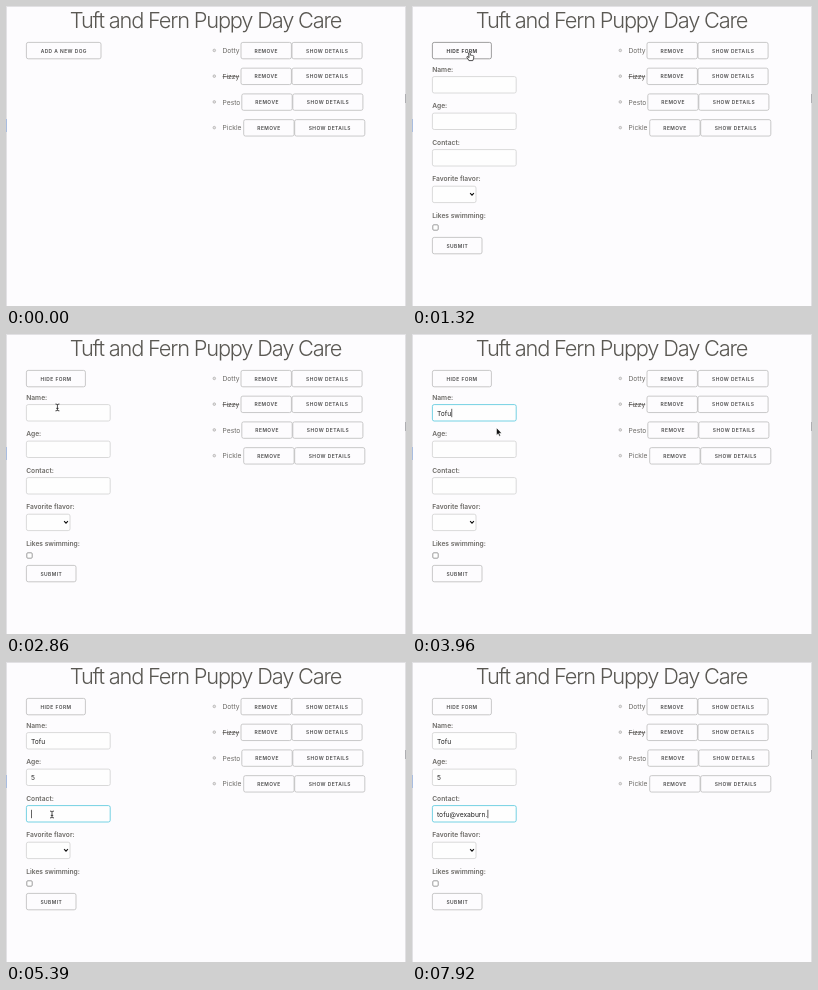
Recreate the animation shown at these times as an HTML page. Size 400x300 px, loop 8 s.

```html
<!DOCTYPE html>
<html lang="en">
<head>
<meta charset="utf-8">
<title>Puppy Day Care</title>
<style>
html, body { margin: 0; width: 100%; height: 100%; overflow: hidden; background: #fdfcfe; }
svg { display: block; width: 400px; height: 300px; font: 6.7px Inter, "Liberation Sans", sans-serif; }
text { fill: #6b6965; white-space: pre; }
.title { font-size: 21.8px; font-weight: 300; letter-spacing: -1.18px; text-anchor: middle; fill: #5a5853; }
.struck { text-decoration: line-through; fill: #55534f; }
.label { font-weight: 600; }
.bullet { fill: #e4e3e4; stroke: #a3a1a0; stroke-width: .6; }
.button rect { fill: none; stroke: #bbb; stroke-width: .8; }
.button text { font-size: 4.9px; font-weight: 600; letter-spacing: .45px; text-anchor: middle; fill: #4c4c4c; }
.button.hover rect { stroke: #888; }
.button.hover text { fill: #2c2c2c; }
.field rect { fill: #fefefe; stroke: #d1d1d1; stroke-width: .8; }
.field text { fill: #222; }
.field.focus rect { stroke: #52c6dc; }
.field line { stroke: #222; stroke-width: .7; }
</style>
</head>
<body>
<svg viewBox="0 0 400 300">
  <g id="page">
    <path d="M0 .5H400M.5 0V300M399.5 0V300" stroke="#e2e1e4"/>
    <path d="M.5 113V126" stroke="#a9bde0"/>
    <path d="M399.5 88V97" stroke="#aeaeb2"/>
    <text class="title" x="199.6" y="22.2">Tuft and Fern Puppy Day Care</text>
  </g>
  <g id="form">
    <rect x="20.4" y="180.2" width="43.6" height="16.4" rx="1.8" fill="#fefefe" stroke="#d1d1d1" stroke-width=".8"/>
    <path d="M58.1 187.2l1.9 2 1.9-2" fill="none" stroke="#111" stroke-width="1.1"/>
    <rect x="20.8" y="218.8" width="5.4" height="5.4" rx="1" fill="#fff" stroke="#767676" stroke-width=".7"/>
  </g>
  <g id="cursor" stroke-linejoin="round" stroke-linecap="round">
    <path id="arrow" d="M0 0V7.2L1.7 5.7 2.8 8.2 4 7.7 2.9 5.2H5.1Z" fill="#111" stroke="#fff" stroke-width=".5"/>
    <path id="hand" d="M-.7 .6Q0-.4.7.6V3.2Q1.4 2.6 2 3.3 2.7 2.9 3.2 3.6 4.3 3.4 4.3 4.6 4.3 6.8 3.3 8.6H-.6Q-1.4 7-2.6 5.4-2.8 4.2-1.6 4.6L-.7 5.4Z" fill="#fff" stroke="#222" stroke-width=".8"/>
    <path id="beam" d="M-1.6-3.4Q0-3.4 0-2.6 0-3.4 1.6-3.4M0-2.6V2.6M-1.6 3.4Q0 3.4 0 2.6 0 3.4 1.6 3.4M-.8 .9H.8" fill="none" stroke="#222" stroke-width=".8"/>
  </g>
</svg>
<script>
const LOOP = 8000, STEP = 110;
const $ = id => document.getElementById(id);
const page = $("page"), form = $("form"), cursor = $("cursor");

function add(parent, tag, attrs, text = "") {
  const el = document.createElementNS("http://www.w3.org/2000/svg", tag);
  for (const key in attrs) el.setAttribute(key, attrs[key]);
  el.textContent = text;
  return parent.appendChild(el);
}

function box(parent, x, y, width) {
  return add(parent, "rect", { x: x + .4, y: y + .4, width: width - .8, height: 16.4, rx: 1.8 });
}

function button(parent, x, y, width, label) {
  const g = add(parent, "g", { class: "button" });
  box(g, x, y, width);
  add(g, "text", { x: x + width / 2 + .1, y: y + 10.7 }, label);
  return g;
}

function field(y) {
  const g = add(form, "g", { class: "field" });
  box(g, 20, y, 84.6);
  const text = add(g, "text", { x: 25, y: y + 11.3 });
  const caret = add(g, "line", { y1: y + 4.6, y2: y + 13 });
  return { g, text, caret };
}

[["Dotty", 234.6], ["Fizzy", 234.6], ["Pesto", 235.4], ["Pickle", 237.3]].forEach(([name, x], i) => {
  const y = 36 + 25.75 * i;
  add(page, "circle", { class: "bullet", cx: 208.3, cy: y + 8.4, r: 1.3 });
  add(page, "text", { class: i == 1 ? "struck" : "", x: 216.5, y: y + 11 }, name);
  button(page, x, y, 51.2, "REMOVE");
  button(page, x + 51, y, 70.9, "SHOW DETAILS");
});

["Name:", "Age:", "Contact:", "Favorite flavor:", "Likes swimming:"].forEach((label, i) =>
  add(form, "text", { class: "label", x: 20.2, y: 65.7 + 36.5 * i }, label));

const opener = button(page, 20, 36, 75.4, "ADD A NEW DOG");
const closer = button(form, 20, 36, 59.8, "HIDE FORM");
button(form, 20, 231, 50.4, "SUBMIT");

// Each entry: value, focus span, moment of every keystroke
const entries = [
  { ...field(70.2), value: "Tofu", from: 2970, to: 4400, keys: [3410, 3520, 3630, 3740] },
  { ...field(106.7), value: "5", from: 4400, to: 5390, keys: [4840] },
  { ...field(143.2), value: "tofu@vexaburn.", from: 5390, to: LOOP,
    keys: [5720, 5830, 5940, 6050, 6270, 6380, 6600, 6710, 6930, 7150, 7260, 7590, 7700, 7920] }
];

const path = [
  [110, 140, 310], [770, 57.5, 46], [1320, 57.5, 46], [1540, 56.5, 49], [1650, 56.5, 49],
  [1760, 55.5, 53], [1870, 55.5, 49], [2640, 55.5, 49], [2970, 50, 82], [3850, 50, 82],
  [3960, 84.5, 94], [4290, 58, 116], [4950, 58, 116], [5280, 46, 152.5], [LOOP, 46, 152.5]
];

const within = (t, from, to) => t >= from && t < to;
const show = (el, on) => el.setAttribute("display", on ? "inline" : "none");

function position(t) {
  const i = Math.max(1, path.findIndex(p => p[0] >= t));
  const [t0, x0, y0] = path[i - 1], [t1, x1, y1] = path[i];
  let k = Math.max(0, (t - t0) / (t1 - t0));
  k = k * k * (3 - 2 * k);
  return [x0 + (x1 - x0) * k, y0 + (y1 - y0) * k];
}

function draw(now) {
  const t = Math.floor(now % LOOP / STEP) * STEP;
  const open = within(t, 1320, 2090) || t >= 2640;
  const hover = within(t, 990, 2750);
  show(form, open);
  show(opener, !open);
  for (const b of [opener, closer]) b.classList.toggle("hover", hover);

  for (const e of entries) {
    const focus = within(t, e.from, e.to);
    const blink = within(t, 3190, 3410) || within(t, 5610, 5720);
    e.text.textContent = e.value.slice(0, e.keys.filter(k => k <= t).length);
    e.g.classList.toggle("focus", focus);
    show(e.caret, focus && !blink);
    if (focus && open) {
      const x = 25.5 + e.text.getComputedTextLength();
      e.caret.setAttribute("x1", x);
      e.caret.setAttribute("x2", x);
    }
  }

  const [x, y] = position(t);
  const beam = open && x < 104 && [70, 107, 143].some(top => within(y, top, top + 17));
  cursor.setAttribute("transform", `translate(${x} ${y})`);
  show(cursor, within(t, 220, 3410) || within(t, 3960, 4840) || within(t, 4950, 5720));
  show($("hand"), hover);
  show($("beam"), !hover && beam);
  show($("arrow"), !hover && !beam);
  requestAnimationFrame(draw);
}
requestAnimationFrame(draw);
</script>
</body>
</html>
```
